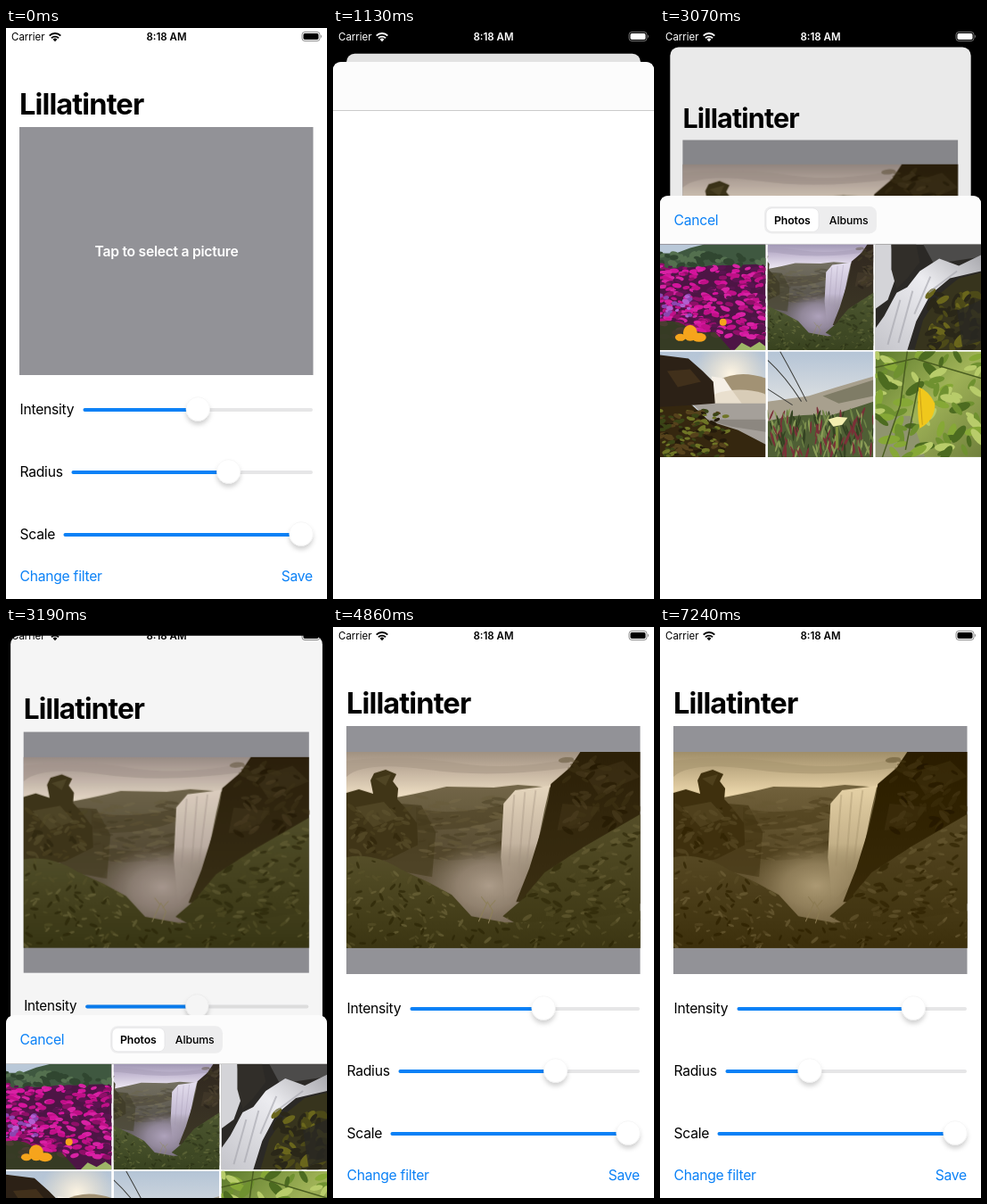
Write an HTML page that moves like this. It is 360 px wide and 640 px high and loops after 8000 ms.

```html
<!DOCTYPE html>
<html lang="en">
<head>
<meta charset="utf-8">
<title>Lillatinter</title>
<style>
html, body { margin: 0; width: 100%; height: 100%; overflow: hidden; background: #000; }
#stage { display: block; width: 100%; height: 100%; font-family: Inter, "Open Sans", sans-serif; }
.body { font-size: 15.7px; letter-spacing: -.27px; }
.blue { fill: #0b81f6; }
.mid { text-anchor: middle; }
.semi { font-weight: 600; }
.small { font-size: 11.5px; }
.seg { font-size: 12.3px; letter-spacing: -.1px; text-anchor: middle; }
</style>
</head>
<body>
<svg id="stage" viewBox="0 0 360 640" xmlns="http://www.w3.org/2000/svg">
  <defs>
    <filter id="shadow" x="-50%" y="-50%" width="200%" height="220%">
      <feDropShadow dx="0" dy="4" stdDeviation="2.8" flood-opacity=".18"/>
    </filter>
    <filter id="sepia" x="0" y="0" width="1" height="1" color-interpolation-filters="sRGB">
      <feColorMatrix id="tone" type="matrix"/>
    </filter>
    <linearGradient id="sky" x2="0" y2="1">
      <stop offset="0" stop-color="#a097b4"/><stop offset=".45" stop-color="#c6bcd4"/><stop offset="1" stop-color="#f1ecf6"/>
    </linearGradient>
    <linearGradient id="hill" x2="0" y2="1">
      <stop offset="0" stop-color="#747061"/><stop offset=".4" stop-color="#5c5850"/><stop offset="1" stop-color="#7a7080"/>
    </linearGradient>
    <linearGradient id="fall" x2="0" y2="1">
      <stop offset="0" stop-color="#e4deee"/><stop offset=".5" stop-color="#c4bbd2"/><stop offset="1" stop-color="#a79bb4" stop-opacity="0"/>
    </linearGradient>
    <linearGradient id="cliff" x2="0" y2="1">
      <stop offset="0" stop-color="#30271f"/><stop offset="1" stop-color="#3d3826"/>
    </linearGradient>
    <linearGradient id="grass" x2="0" y2="1">
      <stop offset="0" stop-color="#525c35"/><stop offset="1" stop-color="#38421f"/>
    </linearGradient>
    <radialGradient id="mist">
      <stop offset="0" stop-color="#aea2bb"/><stop offset=".5" stop-color="#9e93aa" stop-opacity=".75"/><stop offset="1" stop-color="#8f859a" stop-opacity="0"/>
    </radialGradient>
    <radialGradient id="glow">
      <stop offset="0" stop-color="#fff6e4"/><stop offset="1" stop-color="#f3e2c4" stop-opacity="0"/>
    </radialGradient>
    <linearGradient id="blueSky" x2="0" y2="1">
      <stop offset="0" stop-color="#b4c4d6"/><stop offset="1" stop-color="#e6e6e4"/>
    </linearGradient>
    <linearGradient id="stream" x1="1" x2="0" y2="1">
      <stop offset="0" stop-color="#a9a9ae"/><stop offset=".4" stop-color="#ececf0"/><stop offset="1" stop-color="#c4c4ca"/>
    </linearGradient>
    <linearGradient id="leafBack" x2="1" y2="1">
      <stop offset="0" stop-color="#5c7a2c"/><stop offset=".5" stop-color="#9fb257"/><stop offset="1" stop-color="#70803c"/>
    </linearGradient>
    <clipPath id="slopeClip"><path d="M329 70L268 105 222 135 196 166 175 184 205 200 329 220z"/></clipPath>
    <clipPath id="frontClip"><path d="M0 118Q30 112 62 132L92 146 118 160 140 184 178 191 250 190 329 178V220H0z"/></clipPath>

    <symbol id="valley" viewBox="0 0 329 220" preserveAspectRatio="xMidYMid slice">
      <rect width="329" height="52" fill="url(#sky)"/>
      <path d="M0 10Q60 2 120 12T250 8V18Q160 30 90 20T0 28z" fill="#a99fba" opacity=".6"/>
      <path d="M40 54Q80 47 112 39L165 40 192 37 232 40V200H0V60z" fill="url(#hill)"/>
      <path d="M78 62Q110 74 182 58V72Q130 92 78 86zM92 102Q130 116 178 98V108Q130 128 90 118z" fill="#47412f" opacity=".45"/>
      <path d="M60 58L84 60 100 90 96 140 40 130z" fill="#48452f" opacity=".7"/>
      <g id="plateau" opacity=".4"/>
      <ellipse cx="160" cy="150" rx="72" ry="50" fill="url(#mist)"/>
      <path d="M176 58L189 43 228 38 222 64 214 104 205 142 178 168 173 118z" fill="url(#fall)"/>
      <path d="M188 48L182 128M200 45L193 132M212 43L202 124" stroke="#a196b0" stroke-width="2" opacity=".35" fill="none"/>
      <path d="M262 0L250 18 229 36 226 54 218 88 205 130 190 168 329 170V0z" fill="url(#cliff)"/>
      <path d="M266 24L310 10 329 28 282 48zM242 58L284 62 268 84 236 88z" fill="#4c4230" opacity=".45"/>
      <g id="crag" opacity=".45"/>
      <path d="M329 70L268 105 222 135 196 166 175 184 205 200 329 220z" fill="url(#grass)"/>
      <g id="slope" clip-path="url(#slopeClip)" opacity=".6"/>
      <path d="M0 46L14 42 30 47 27 32 31 24 44 20 56 25 52 33 58 41 57 53 66 63 79 80 80 104 48 120 0 130z" fill="#423e2a"/>
      <g id="tower" opacity=".5"/>
      <path d="M32 30L50 25 44 38zM10 62L42 56 58 74 30 84z" fill="#646040" opacity=".5"/>
      <path d="M0 118Q30 112 62 132L92 146 118 160 140 184 178 191 250 190 329 178V220H0z" fill="url(#grass)"/>
      <g id="front" clip-path="url(#frontClip)" opacity=".6"/>
      <path d="M148 190L158 168 164 178 159 192M157 170L151 162M160 174L167 166" stroke="#918b65" fill="none"/>
    </symbol>

    <symbol id="flowers" viewBox="0 0 119 118" preserveAspectRatio="none">
      <rect width="119" height="118" fill="#4d1545"/>
      <path d="M0 0H119V22L60 24 0 28z" fill="#3f5840"/>
      <path d="M0 0H50L34 4 18 10 0 10z" fill="#b9c8d8"/>
      <g id="bush"/><g id="petals"/><g id="violets"/>
      <path d="M0 86Q20 84 30 92T62 98L80 118H0z" fill="#33421f" opacity=".85"/>
      <g fill="#f6a41c"><ellipse cx="34" cy="99" rx="8" ry="9"/><ellipse cx="44" cy="104" rx="8" ry="5"/><ellipse cx="23" cy="104" rx="6" ry="4"/><circle cx="71" cy="87" r="4"/></g>
      <path d="M84 118L92 110 102 115 112 109 119 114V118z" fill="#9eb667"/>
    </symbol>

    <symbol id="rapids" viewBox="0 0 119 118" preserveAspectRatio="none">
      <rect width="119" height="118" fill="#2b2926"/>
      <path d="M54 0H119V14L66 22z" fill="#4c4b4a"/>
      <path d="M119 12L94 24 72 16 50 30 36 48 24 54 10 80 0 94V118H36L46 86 62 56 84 38 119 30z" fill="url(#stream)"/>
      <path d="M0 0H18L22 40 14 62 0 72z" fill="#d4d4d8"/>
      <path d="M18 0H46L50 20 36 38 24 50 18 28z" fill="#312e29"/>
      <path d="M74 54L94 38 119 32V118H44L54 84z" fill="#37341d"/>
      <g id="lichen"/>
      <path d="M92 74L119 62V108L98 114z" fill="#292722" opacity=".8"/>
      <path d="M28 62L14 112M42 52L26 110M62 36L44 78M92 30L60 54" stroke="#a4a4ac" stroke-width="2" opacity=".6"/>
    </symbol>

    <symbol id="river" viewBox="0 0 119 118" preserveAspectRatio="none">
      <rect width="119" height="118" fill="url(#blueSky)"/>
      <circle cx="80" cy="26" r="42" fill="url(#glow)"/>
      <path d="M66 32Q90 20 119 30V66H62z" fill="#a29274"/>
      <path d="M58 28L72 30 80 42 92 58H62z" fill="#f5efe6"/>
      <ellipse cx="90" cy="54" rx="34" ry="11" fill="#e6dbc9" opacity=".8"/>
      <path d="M36 58H119V106L70 92z" fill="#a5a09a"/>
      <path d="M50 76H119V90L80 84z" fill="#8c8780"/>
      <path d="M0 4L32 8 48 22 60 34 62 58 36 60 0 70z" fill="#2c2116"/>
      <path d="M8 22L34 20 46 34 20 40z" fill="#4a371d" opacity=".7"/>
      <path d="M0 62L36 60 56 78 88 88 119 104V118H0z" fill="#35270f"/>
      <g id="moss"/>
    </symbol>

    <symbol id="dune" viewBox="0 0 119 118" preserveAspectRatio="none">
      <rect width="119" height="70" fill="url(#blueSky)"/>
      <path d="M0 56L46 50 78 40 119 28V118H0z" fill="#a8a08e"/>
      <path d="M62 50L119 32V50L80 58z" fill="#7f7c66"/>
      <path d="M0 78Q40 68 70 72L119 56V118H0z" fill="#4f5f35"/>
      <g id="blades"/>
      <path d="M0 10Q20 28 38 56M14 0Q32 32 44 56M0 42L28 60" stroke="#3c3d3a" fill="none"/>
      <path d="M68 76L78 73 90 74 84 82 74 84z" fill="#f3efb0"/><path d="M78 84V108" stroke="#81933e" stroke-width="3"/>
    </symbol>

    <symbol id="leaves" viewBox="0 0 119 118" preserveAspectRatio="none">
      <rect width="119" height="118" fill="url(#leafBack)"/>
      <path d="M0 72H40L56 118H0z" fill="#8f946f"/>
      <g id="foliage"/>
      <path d="M0 18L44 8 119 30M36 0L28 60 8 118M50 30L34 110" stroke="#4a5e20" stroke-width="1.5" fill="none"/>
      <path d="M49 40Q60 44 67 58 68 76 50 86 46 64 49 40z" fill="#f0c81c"/>
      <path d="M50 42L53 82" stroke="#c99f17"/>
    </symbol>
  </defs>

  <rect width="360" height="640"/>
  <g id="card">
    <rect id="page" width="360" height="640" fill="#fff"/>
    <text x="15" y="96.5" font-size="32.6" font-weight="700" letter-spacing="-.9">Lillatinter</text>
    <rect x="15" y="111" width="329.5" height="278" fill="#929297"/>
    <text id="hint" class="body semi mid" x="180" y="255.5" fill="#fff">Tap to select a picture</text>
    <use id="photo" href="#valley" x="15" y="140" width="329.5" height="220" filter="url(#sepia)"/>
    <g id="sliders"></g>
    <text class="body blue" x="15.5" y="620">Change filter</text>
    <text class="body blue" x="344" y="620" text-anchor="end">Save</text>
    <rect id="dim" width="360" height="640"/>
  </g>
  <rect id="edge" x="6" y="639" width="348" height="1" fill="#333"/>

  <g id="sheet">
    <path d="M0 640V48Q0 38 10 38H350Q360 38 360 48V640z" fill="#fff"/>
    <path d="M0 92V48Q0 38 10 38H350Q360 38 360 48V92z" fill="#fcfcfc"/>
    <rect y="92" width="360" height="1" fill="#cbcbcb"/>
    <g id="bar">
      <text class="body blue" x="15.5" y="71">Cancel</text>
      <rect x="117" y="50" width="126" height="30.5" rx="8" fill="#ededee"/>
      <rect x="119" y="52" width="59" height="26.5" rx="6.5" fill="#fff" stroke="#dededf" stroke-width=".6"/>
      <text class="seg semi" x="148.3" y="69.7">Photos</text>
      <text class="seg" x="211.7" y="69.7" font-weight="500">Albums</text>
    </g>
    <g id="grid"></g>
  </g>

  <g id="status">
    <text class="small" x="6" y="14">Carrier</text>
    <path d="M48.7 8.6A9 9 0 0 1 61.3 8.6M51 11.2A5.8 5.8 0 0 1 59 11.2" fill="none" stroke="currentColor" stroke-width="1.9"/>
    <path d="M55 15.2L52.6 12.8A3.4 3.4 0 0 1 57.4 12.8z"/>
    <text class="small semi mid" x="180" y="14">8:18 AM</text>
    <rect x="332" y="4.5" width="20" height="10" rx="3" fill="none" stroke="currentColor" stroke-opacity=".45"/>
    <rect x="333.5" y="6" width="17" height="7" rx="1.8"/>
    <path d="M353.2 7.8Q355.2 9.5 353.2 11.2z" opacity=".5"/>
  </g>
</svg>
<script>
const LOOP = 8000;
const $ = id => document.getElementById(id);
const set = (el, attrs) => { for (const k in attrs) el.setAttribute(k, attrs[k]); };
function add(parent, tag, attrs) {
  const el = document.createElementNS("http://www.w3.org/2000/svg", tag);
  set(el, attrs);
  parent.appendChild(el);
  return el;
}

// Seeded ellipses inside a box, drawn from top to bottom
function scatter(id, seed, count, [x0, y0, x1, y1], [rx, ry], turn, colours) {
  const rnd = () => (seed = (seed * 16807) % 2147483647) / 2147483647;
  for (let i = 0; i < count; i++) {
    const x = x0 + rnd() * (x1 - x0), y = y0 + (i + rnd()) / count * (y1 - y0), size = .6 + rnd() * .7;
    add($(id), "ellipse", {
      rx: rx * size, ry: ry * size, fill: colours[Math.floor(rnd() * colours.length)],
      transform: `translate(${x} ${y}) rotate(${(rnd() - .5) * turn})`
    });
  }
}
scatter("plateau", 13, 70, [84, 50, 172, 120], [7, 1.6], 30, ["#807a5c", "#454031", "#6b6648"]);
scatter("crag", 29, 60, [246, 8, 329, 90], [7, 2.5], 120, ["#5a4e38", "#1f1a14", "#484026"]);
scatter("tower", 41, 50, [6, 62, 70, 116], [5, 2], 120, ["#67633f", "#2b281b", "#56522f"]);
scatter("slope", 71, 200, [175, 72, 329, 218], [5, 1.8], 90, ["#69703f", "#2b3117", "#545c30"]);
scatter("front", 23, 300, [0, 114, 329, 220], [4, 1.4], 150, ["#747a45", "#272d13", "#596133"]);
scatter("bush", 61, 40, [0, 10, 119, 24], [5, 3], 90, ["#54704f", "#304630"]);
scatter("petals", 17, 300, [0, 24, 119, 104], [4.5, 2.2], 40, ["#d4149c", "#c01088", "#d822a4", "#8f0f68", "#5a1450"]);
scatter("violets", 91, 22, [0, 56, 34, 82], [3, 2], 30, ["#b35fd0", "#8c46b0"]);
scatter("lichen", 83, 60, [62, 54, 119, 118], [7, 3], 160, ["#6a661c", "#2a2718", "#4d4a18"]);
scatter("moss", 35, 130, [0, 66, 76, 118], [4, 2], 60, ["#6f7526", "#241a0a", "#56421c", "#3a4416"]);
scatter("blades", 57, 160, [0, 70, 119, 116], [1.2, 8], 50, ["#6f8446", "#344222", "#7a3038", "#8a9c56"]);
scatter("foliage", 43, 80, [0, 0, 119, 118], [10, 4], 160, ["#86a836", "#4c6b20", "#b8cc6a", "#6f9130"]);

["flowers", "valley", "rapids", "river", "dune", "leaves"].forEach((name, i) => add($("grid"), "use", {
  href: "#" + name, x: i % 3 * 120.75, y: 92.5 + Math.floor(i / 3) * 120, width: 118.5, height: 118.5
}));

function slider(label, left, y) {
  const g = $("sliders"), right = 344;
  add(g, "text", { class: "body", x: 15.5, y: y + 5.5 }).textContent = label;
  const line = { x: left, y: y - 1, height: 4, rx: 2 };
  add(g, "rect", { ...line, width: right - left, fill: "#e6e6e7" });
  const fill = add(g, "rect", { ...line, fill: "#0b81f6" });
  const thumb = add(g, "circle", { cy: y, r: 13.3, fill: "#fff", stroke: "#eee", "stroke-width": .5, filter: "url(#shadow)" });
  return value => {
    const x = left + 13 + value * (right - left - 26);
    set(fill, { width: x - left });
    set(thumb, { cx: x });
  };
}
const intensity = slider("Intensity", 86.5, 427);
const radius = slider("Radius", 73.5, 497);
slider("Scale", 64.5, 567)(1);

// Value held after each evenly spaced step between two times
function steps(t, from, to, before, values) {
  if (t < from) return before;
  const i = Math.floor((t - from) / (to - from) * (values.length - 1) + 1e-6);
  return values[Math.min(i, values.length - 1)];
}
// Last value whose start time has passed
const held = (t, first, ...keys) => keys.reduce((v, [at, next]) => t >= at ? next : v, first);

// Warm tint that keeps highlights pale and turns shadows brown
function sepia(k) {
  const luma = [.3, .59, .11], gain = [1.02, .98, .9], lift = [0, -.05, -.17];
  const rows = gain.map((c, r) =>
    luma.map((w, i) => k * c * w + (i === r ? 1 - k : 0)).join(" ") + ` 0 ${k * lift[r]}`);
  set($("tone"), { values: rows.join(" ") + " 0 0 0 1 0" });
}

function draw(t) {
  const shown = t < 3070
    ? steps(t, 500, 930, 0, [.2, .64, .88, .97, 1])
    : 1 - steps(t, 3070, 3520, 0, [.249, .66, .88, .97, 1]);
  const scale = 1 - .084 * shown;
  const corner = Math.min(10, shown * 40);
  set($("card"), { transform: `translate(${180 * (1 - scale)} ${28.7 * shown}) scale(${scale})` });
  set($("page"), { rx: corner });
  set($("dim"), { opacity: .11 * shown, rx: corner });
  set($("sheet"), { transform: `translate(0 ${602 * (1 - shown)})`, visibility: shown ? "visible" : "hidden" });
  set($("bar"), { opacity: steps(t, 1130, 1580, 0, [0, .3, .6, .85, 1]) });
  set($("grid"), {
    opacity: t < 1870 ? steps(t, 1130, 1580, 0, [0, .25, .5, .75, .88]) : steps(t, 1870, 2300, .88, [.9, .93, .96, .98, 1])
  });
  const ink = shown > .4 ? "#fff" : "#000";
  set($("status"), { fill: ink, color: ink });

  const picked = t >= 3070;
  set($("hint"), { visibility: picked ? "hidden" : "visible" });
  set($("photo"), { visibility: picked ? "visible" : "hidden" });
  set($("edge"), { visibility: t >= 3520 && t < 4860 ? "visible" : "hidden" });

  const level = held(t, .5, [4860, .59], [5140, .69], [5820, .798]);
  intensity(level);
  sepia(.5 + (level - .5) * 1.4);
  radius(held(t, .667, [6580, .5], [7240, .333]));
}

const start = performance.now();
function tick() {
  draw((performance.now() - start) % LOOP);
  requestAnimationFrame(tick);
}
tick();
</script>
</body>
</html>
```
